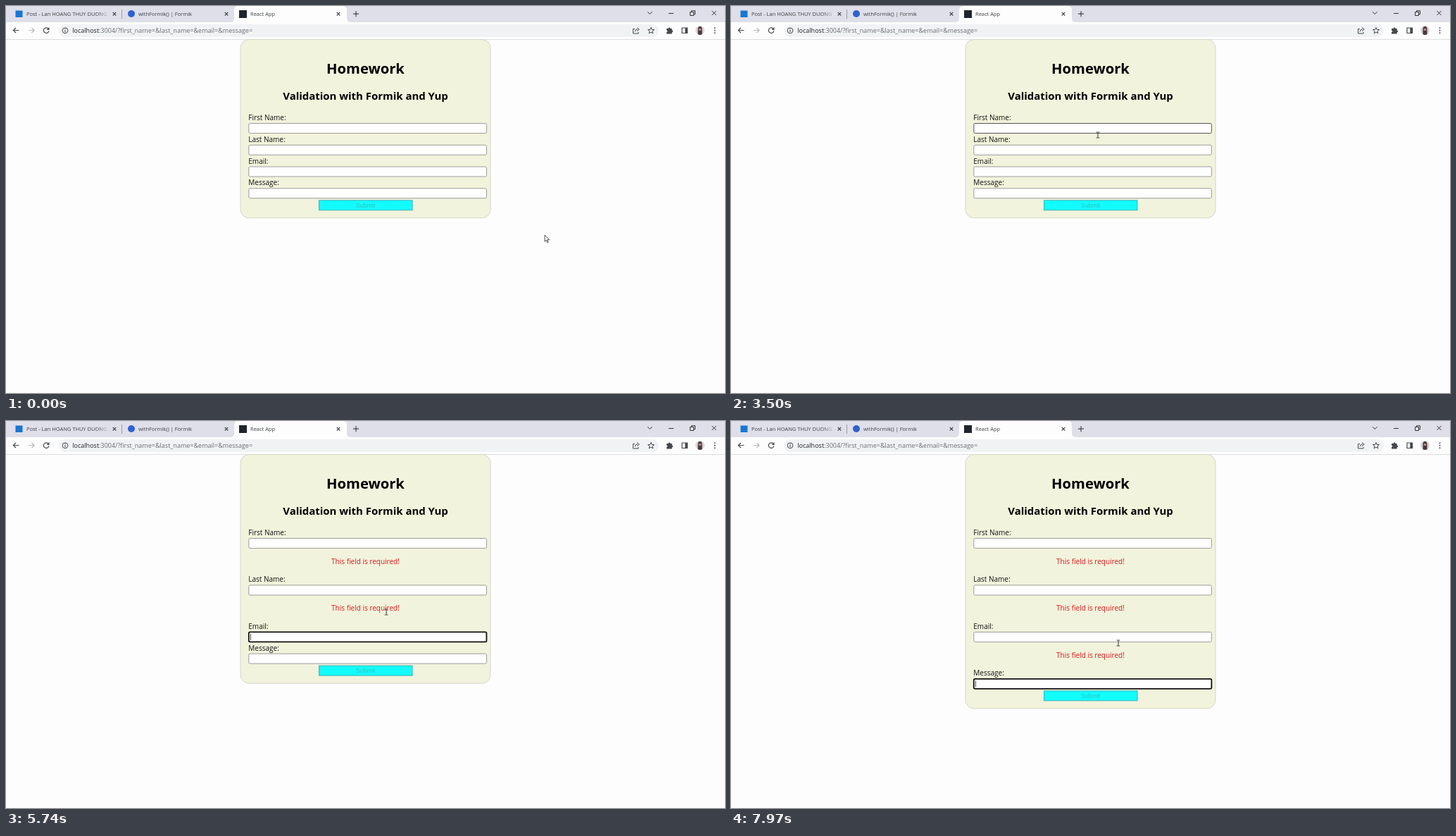
These frames come from a looping animation (1021x549 px, 8 s). An HTML page:

```html
<!DOCTYPE html>
<html lang="en">
<head>
<meta charset="utf-8">
<title>Form validation</title>
<style>
  html, body { margin: 0; width: 100%; height: 100%; overflow: hidden; background: #fdfdfd; }
  svg { display: block; }
  text { font: 10px "Open Sans", "Noto Sans", sans-serif; fill: #111; }
  .tab { font-size: 7.5px; fill: #3c4043; }
  .url { font-size: 9.03px; fill: #6a6d72; }
  .mid { text-anchor: middle; }
  .bold { font-weight: 700; fill: #000; }
  .error { fill: #dc1818; }
  .icon { fill: none; stroke: #45484c; stroke-width: 1.2; }
  .thin { stroke-width: 1; stroke: #333; }
</style>
</head>
<body>
<svg width="1021" height="549" viewBox="0 0 1021 549">
  <defs>
    <linearGradient id="fade"><stop stop-color="#dedfe8" stop-opacity="0"/><stop offset="1" stop-color="#dedfe8"/></linearGradient>
    <clipPath id="title"><rect x="29" width="117" height="23"/></clipPath>
    <clipPath id="face"><circle cx="985.5" cy="34.5" r="6.5"/></clipPath>
    <path id="x" class="icon" d="M-2.3-2.3 2.3 2.3M2.3-2.3-2.3 2.3"/>
  </defs>

  <!-- Tab strip -->
  <rect width="1021" height="23" fill="#dedfe8"/>
  <path d="M318 23q6 0 6-6V6q0-6 6-6H478q6 0 6 6V17q0 6 6 6z" fill="#fdfdfd"/>
  <rect x="13.5" y="6.5" width="10" height="9.5" fill="#1976d2"/>
  <circle cx="178" cy="11" r="5" fill="#2f62d0"/>
  <rect x="331" y="6" width="11" height="11" fill="#20252d"/>
  <path d="M164.5 5v13" class="icon" style="stroke:#9a9ca6;stroke-width:1"/>
  <text class="tab" x="29" y="13.8" clip-path="url(#title)">Post - Lan HOANG THUY DUONG</text>
  <rect x="130" y="3" width="17" height="17" fill="url(#fade)"/>
  <text class="tab" x="188" y="13.8">withFormik() | Formik</text>
  <text class="tab" x="347" y="13.8">React App</text>
  <use href="#x" x="154" y="11.2"/><use href="#x" x="313" y="11.2"/><use href="#x" x="472" y="11.2"/>
  <path class="icon" d="M497 7.2v8M493 11.2h8"/>
  <path class="icon thin" d="M911 8.2l3.3 3.3 3.3-3.3M941 10.5h7M971.5 8.5h5v5h-5zM973.5 8.5v-1.8h5v5h-2M1002.5 7l6 6M1008.5 7l-6 6"/>

  <!-- Toolbar -->
  <rect y="23" width="1021" height="24" fill="#fdfdfd"/>
  <rect x="75" y="26" width="852" height="18" rx="9" fill="#f1f2f4"/>
  <path d="M0 47.5H1021" stroke="#dcdde0"/>
  <path class="icon" d="M18.5 34.5H10.5M14 31l-3.6 3.5 3.6 3.5"/>
  <path class="icon" style="stroke:#b8babd" d="M32 34.5h8M36.5 31l3.6 3.5-3.6 3.5"/>
  <path class="icon" d="M60.3 32.5a3.8 3.8 0 1 0 .6 2.8"/><path d="M61.5 30v3.9h-3.9z" fill="#45484c"/>
  <circle class="icon" cx="84" cy="34.8" r="3.9" style="stroke-width:1"/>
  <path class="icon" d="M84 34.2v2.9M84 32.2v1.1"/>
  <text class="url" x="94.3" y="38"><tspan fill="#202124">localhost</tspan>:3004/?first_name=&amp;last_name=&amp;email=&amp;message=</text>
  <path class="icon" style="stroke-width:1" d="M893 32.5h-2.5v6.5h7.5v-2M893 36.5q.5-3.5 4-3.7M896 30.5l3.2 2.6-3.2 2.6M916 30.4l1.2 3 3.3.2-2.5 2.1.8 3.2-2.8-1.8-2.8 1.8.8-3.2-2.5-2.1 3.3-.2z"/>
  <path d="M938 32h2.6a1.4 1.4 0 0 1 2.8 0h2.3v2.5a1.4 1.4 0 0 1 0 2.8V39.5h-7.7v-2.4a1.3 1.3 0 0 0 0-2.6z" fill="#45484c"/>
  <path class="icon" d="M960 31h7.5v7.5h-7.5z"/><path d="M964.3 31h3.2v7.5h-3.2z" fill="#45484c"/>
  <g clip-path="url(#face)">
    <rect x="979" y="28" width="13" height="13" fill="#d9d6d8"/>
    <path d="M982.5 41v-8q0-4 3-4t3 4v8z" fill="#49363c"/>
    <circle cx="985.5" cy="33.5" r="1.8" fill="#b98f87"/>
  </g>
  <g fill="#45484c"><circle cx="1006.5" cy="31.2" r="1"/><circle cx="1006.5" cy="34.7" r="1"/><circle cx="1006.5" cy="38.2" r="1"/></g>

  <!-- Form -->
  <rect id="card" x="333" y="47.5" width="355" rx="12" fill="#f2f3dc" stroke="#d4d6c8"/>
  <text class="mid bold" x="510.5" y="95.8" style="font-size:20.2px">Homework</text>
  <text class="mid bold" x="510.5" y="132.8" style="font-size:14.95px">Validation with Formik and Yup</text>
  <g id="fields"></g>
  <g id="submit">
    <rect x="444.5" y="-6.8" width="132.5" height="14" fill="#12fcfc" stroke="#3fb4b8"/>
    <text class="mid" x="510.5" y="3.2" style="font:8.87px 'Liberation Sans',Arial,sans-serif;fill:#2cc4c6">Submit</text>
  </g>

  <path id="arrow" d="M0 0v9.2l2.2-2 1.5 3.4 1.5-.7-1.5-3.2h2.9z" fill="#fff" stroke="#222" stroke-width=".8"/>
  <path id="beam" class="icon thin" d="M-2.3-4h1.6l.7.6.7-.6h1.6M0-3.4v6.8M-2.3 4h1.6l.7-.6.7.6h1.6"/>
</svg>
<script>
const LOOP = 8000, LAG = 80, ROW = 30.75, ERROR_HEIGHT = 35.7;
const clicks = [3750, 4450, 5500, 6520];
// Pointer waypoints: time, x, y
const path = [
  [0, 765, 325], [1400, 765, 325], [2400, 520, 206], [2460, 520, 203], [2530, 520, 184],
  [2700, 521, 175], [3400, 521, 175], [3500, 521, 183], [3650, 521, 174], [4000, 521, 174],
  [4350, 521, 204], [4500, 521, 204], [4800, 520, 249], [5000, 520, 249], [5400, 540, 271],
  [5900, 540, 271], [6400, 567, 338], [6600, 567.5, 336], [7000, 567.5, 336],
  [7850, 553, 326], [7970, 550, 315], [LOOP, 550, 314]
];
const $ = id => document.getElementById(id);
const show = (el, on) => el.setAttribute("visibility", on ? "visible" : "hidden");
const move = (el, x, y) => el.setAttribute("transform", `translate(${x} ${y})`);

const fields = ["First Name:", "Last Name:", "Email:", "Message:"].map(label => {
  const g = document.createElementNS("http://www.w3.org/2000/svg", "g");
  g.innerHTML = `<text x="344.3" y="-11.5">${label}</text>
    <rect x="344.8" y="-7" width="337.6" height="14" rx="1.8" fill="#fefefe"/>
    <path d="M347.5-4.5v9" stroke="#222" stroke-width=".8"/>
    <text class="mid error" x="510.5" y="29.4">This field is required!</text>`;
  $("fields").append(g);
  const [, box, caret, error] = g.children;
  return { g, box, caret, error };
});

function pointer(t) {
  const i = Math.max(1, path.findIndex(p => p[0] > t));
  const [t0, x0, y0] = path[i - 1], [t1, x1, y1] = path[i];
  const u = Math.max(0, (t - t0) / (t1 - t0)), k = u * u * (3 - 2 * u);
  return [x0 + (x1 - x0) * k, y0 + (y1 - y0) * k];
}

function draw(t) {
  const focus = clicks.filter(c => t >= c).length - 1;
  const [hx, hy] = pointer(t - LAG);
  let y = 173.5, overText = false;
  fields.forEach(({ g, box, caret, error }, i) => {
    const focused = i === focus, failed = i < focus;
    const hover = hx > 344 && hx < 683 && Math.abs(hy - y) < 7.5;
    move(g, 0, y);
    box.setAttribute("stroke", focused ? "#101010" : hover ? "#555" : "#9b9b9b");
    box.setAttribute("stroke-width", focused ? 1.8 : 1);
    show(caret, focused && (t - clicks[i]) % 1000 < 500);
    show(error, failed);
    overText ||= hover || failed && Math.abs(hx - 510.5) < 49 && Math.abs(hy - y - 26) < 10;
    y += ROW + (failed ? ERROR_HEIGHT : 0);
  });
  move($("submit"), 0, y - 14);
  $("card").setAttribute("height", y + 4.2 - 47.5);
  const [x, py] = pointer(t);
  move($("arrow"), x, py);
  move($("beam"), x, py);
  show($("arrow"), !overText);
  show($("beam"), overText);
}

function frame() {
  draw(performance.now() % LOOP);
  requestAnimationFrame(frame);
}
frame();
</script>
</body>
</html>
```
